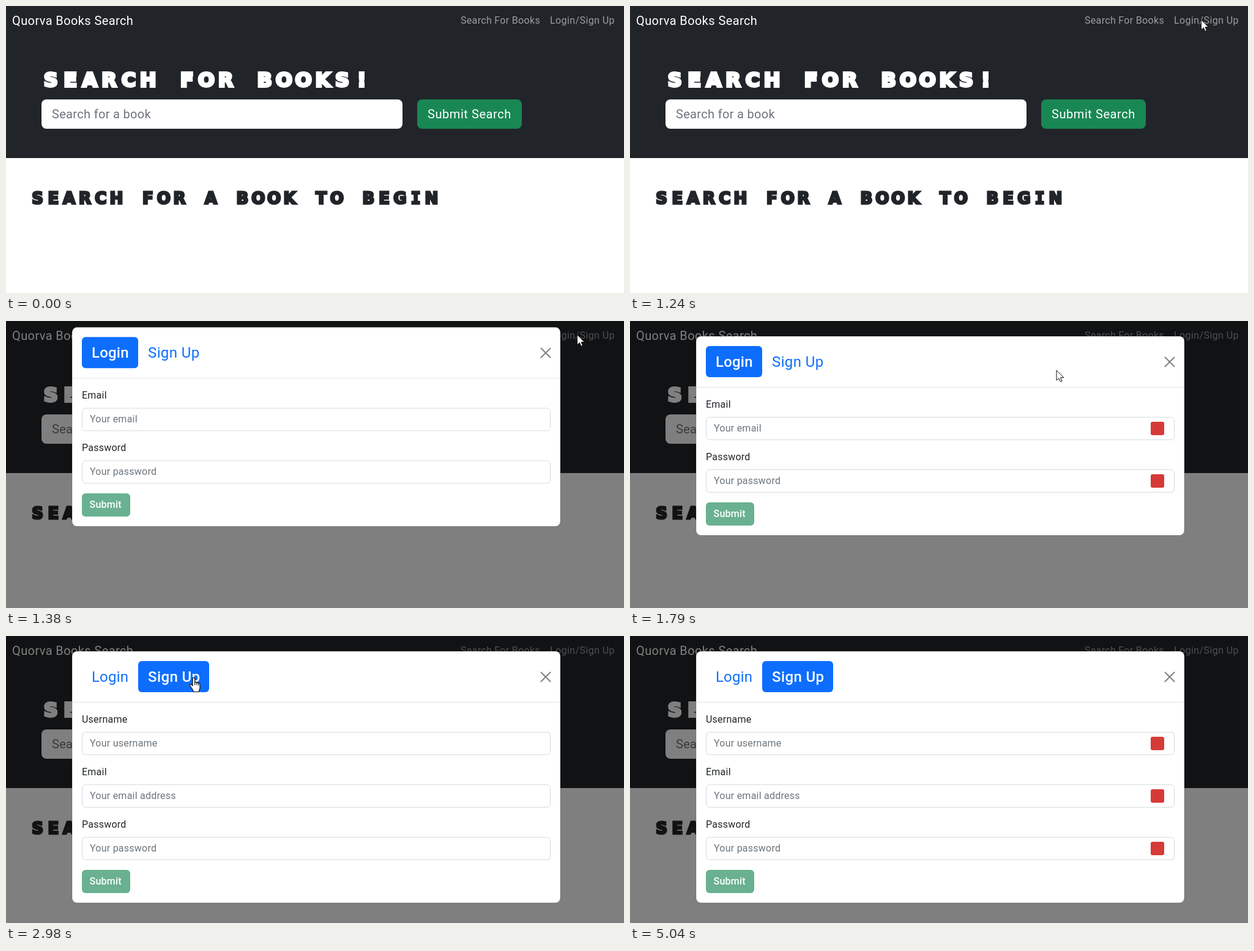
An HTML page that plays this animation: 1010x470 px, repeating every 5.08 s.

```html
<!DOCTYPE html>
<html lang="en">
<head>
<meta charset="utf-8">
<title>Book search</title>
<style>
  html, body { margin: 0; width: 100%; height: 100%; overflow: hidden; background: #fff; }
  svg { display: block; width: 1010px; height: 470px; }
  text { font-family: Roboto, Inter, sans-serif; white-space: pre; }
  .wide { font-family: "DejaVu Sans", sans-serif; font-weight: 700; text-anchor: middle; stroke-linejoin: miter; }
  .slab { font-family: "DejaVu Sans Mono", monospace; }
</style>
</head>
<body>
<svg id="stage" viewBox="0 0 1010 470" xmlns="http://www.w3.org/2000/svg"></svg>
<script>
const LOOP = 5080;
const OPEN = 1241, LOGIN_ICONS = 1700, SWITCH = 2670, SIGNUP_ICONS = 3200;
const SHOW = 130, FADE = 150, SLIDE = 300;
const WHITE = '#fff', INK = '#212529', HINT = '#6c757d';
const BLUE = '#0d6efd', BLUE_HOVER = '#0a58ca';
const NAV = '#9b9d9f', NAV_HOVER = '#c7c8c9';

const clamp = v => Math.max(0, Math.min(1, v));
const ramp = (t, start, length) => clamp((t - start) / length);
const easeOut = p => 1 - Math.pow(1 - p, 1.95);
const easeBoth = p => p * p * (3 - 2 * p);

const rect = (x, y, w, h, r, fill, extra = '') =>
  `<rect x="${x}" y="${y}" width="${w}" height="${h}" rx="${r}" fill="${fill}" ${extra}/>`;

const text = (str, x, y, size, fill, spacing = 0.015, extra = '') =>
  `<text x="${x}" y="${y}" font-size="${size}" fill="${fill}" letter-spacing="${spacing}em" ${extra}>${str}</text>`;

// Heavy monospaced heading: every letter is centred in its own cell
function heading(str, x, y, cell, size, stroke, fill) {
  const xs = [...str].map((c, i) => (x + (i + 0.5) * cell).toFixed(2)).join(' ');
  const body = str.replace(/I/g, '<tspan class="slab">I</tspan>');
  return `<text class="wide" x="${xs}" y="${y}" font-size="${size}" fill="${fill}" stroke="${fill}" stroke-width="${stroke}">${body}</text>`;
}

function field(label, hint, i) {
  const y = 86 * i;
  return text(label, 124, y + 142, 16, INK) +
    rect(124.5, y + 157.5, 765, 37, 5.5, WHITE, 'stroke="#d6dbe0"') +
    text(hint, 137, y + 181, 16, HINT);
}

function pane(id, fields) {
  const y = 211 + 86 * (fields.length - 1);
  const icons = fields.map((f, i) => rect(851, 165 + 86 * i, 22, 22, 3, '#d63a38')).join('');
  return `<g id="${id}">` + fields.map(([label, hint], i) => field(label, hint, i)).join('') +
    rect(124, y, 79, 38, 6, '#69b190') +
    text('Submit', 136.5, y + 24, 16, WHITE, 0.015, 'font-weight="500"') +
    `<g id="${id}Icons">${icons}</g></g>`;
}

const page =
  rect(0, 0, 1010, 470, 0, WHITE) +
  rect(0, 0, 1010, 249, 0, INK) +
  text('Quorva Books Search', 10, 31, 20, WHITE, 0.02) +
  text('Search For Books', 743, 29, 16, NAV, 0.02) +
  text('Login/Sign Up', 889, 29, 16, NAV, 0.026, 'id="navLogin"') +
  heading('SEARCH FOR BOOKS!', 57.5, 132.4, 31.75, 32, 3.8, WHITE) +
  rect(58, 153, 590, 48, 8, WHITE) +
  text('Search for a book', 75, 184, 20, HINT, 0.016) +
  rect(672, 153, 171, 48, 8, '#198754') +
  text('Submit Search', 689, 184, 20, WHITE, 0.028) +
  heading('SEARCH FOR A BOOK TO BEGIN', 38.8, 323.6, 25.75, 26, 3.1, INK);

const modal =
  `<g id="modal">` +
  rect(108, 25, 798, 326, 8, WHITE, 'id="card" stroke="#000" stroke-opacity=".2"') +
  rect(108, 108, 798, 1, 0, '#dee2e6') +
  rect(124, 41, 92, 51, 6, BLUE, 'id="pill"') +
  text('Login', 140, 74.5, 24, WHITE, 0.008, 'id="tabLogin"') +
  text('Sign Up', 232, 74.5, 24, BLUE, 0.016, 'id="tabSignup"') +
  `<path d="M874.5 59.5l15 15m0-15l-15 15" stroke="#808080" stroke-width="2" stroke-linecap="round"/>` +
  pane('login', [['Email', 'Your email'], ['Password', 'Your password']]) +
  pane('signup', [['Username', 'Your username'], ['Email', 'Your email address'], ['Password', 'Your password']]) +
  `</g>`;

const pointers =
  `<path id="arrow" d="M0 0V16.5L3.9 13L6.4 18.8L9 17.7L6.5 12H11.8Z" fill="#fff" stroke="#111" stroke-width="1"/>` +
  `<g id="hand" fill="#fff" stroke="#111" stroke-width="1.2" stroke-linejoin="round">` +
  `<path d="M-3 14V2.5a1.8 1.8 0 0 1 3.6 0V9c.4-1.4 3-1.2 3.2.3.8-1 2.8-.6 2.9.8.9-.7 2.3-.1 2.3 1.4V17c0 3-1.5 4-1.8 7H-1.5c-.3-3-2-4-3.5-6.5L-7.4 13.5c-.8-1.6 1.4-2.6 2.6-1.2z"/>` +
  `<path d="M.6 9v4M3.8 9.5v3.5M6.7 10.5v3" fill="none"/></g>`;

document.getElementById('stage').innerHTML =
  page + rect(0, 0, 1010, 470, 0, '#000', 'id="shade"') + modal + pointers;

const el = {};
document.querySelectorAll('#stage [id]').forEach(node => { el[node.id] = node; });
const set = (id, name, value) => el[id].setAttribute(name, value);
const show = (id, on) => set(id, 'visibility', on ? 'inherit' : 'hidden');

function styleTab(id, active, hover) {
  set(id, 'fill', active ? WHITE : hover ? BLUE_HOVER : BLUE);
  set(id, 'font-weight', active ? 500 : 400);
}

// Quadratic strokes of the mouse: start time, length, then three points
const moves = [
  [780, 380, [984, 482], [962, 220], [933.5, 22.5]],
  [1500, 680, [933.5, 22.5], [640, 130], [308, 67.5]],
  [3910, 190, [308, 67.5], [312, 260], [335, 485]]
];

function mouseAt(t) {
  const [start, length, a, b, c] = moves.filter(m => t >= m[0]).pop() || moves[0];
  const p = easeBoth(ramp(t, start, length)), q = 1 - p;
  return a.map((v, i) => q * q * v + 2 * q * p * b[i] + p * p * c[i]);
}

function draw(t) {
  const [x, y] = mouseAt(t);
  const overTab = t > OPEN && x > 216 && x < 332 && y > 41 && y < 92;
  const overNav = t < OPEN && x > 885 && y < 40;
  const switched = t >= SWITCH;
  const second = t >= SWITCH + FADE;
  const shown = ramp(t, OPEN, SHOW);

  set('navLogin', 'fill', overNav ? NAV_HOVER : NAV);
  set('shade', 'opacity', shown / 2);
  set('modal', 'opacity', shown);
  set('modal', 'transform', `translate(0 ${-50 * (1 - easeOut(ramp(t, OPEN, SLIDE)))})`);
  set('card', 'height', second ? 412 : 326);

  set('pill', 'x', switched ? 216 : 124);
  set('pill', 'width', switched ? 116 : 92);
  styleTab('tabLogin', !switched, false);
  styleTab('tabSignup', switched, overTab);

  show('login', !second);
  show('signup', second);
  set('login', 'opacity', 1 - ramp(t, SWITCH, FADE));
  set('signup', 'opacity', ramp(t, SWITCH + FADE, FADE));
  show('loginIcons', t >= LOGIN_ICONS);
  show('signupIcons', t >= SIGNUP_ICONS);

  for (const id of ['arrow', 'hand']) {
    set(id, 'transform', `translate(${x} ${y})`);
    show(id, (id === 'hand') === overTab);
  }
}

const begin = performance.now();
function tick() {
  draw((performance.now() - begin) % LOOP);
  requestAnimationFrame(tick);
}
tick();
</script>
</body>
</html>
```
